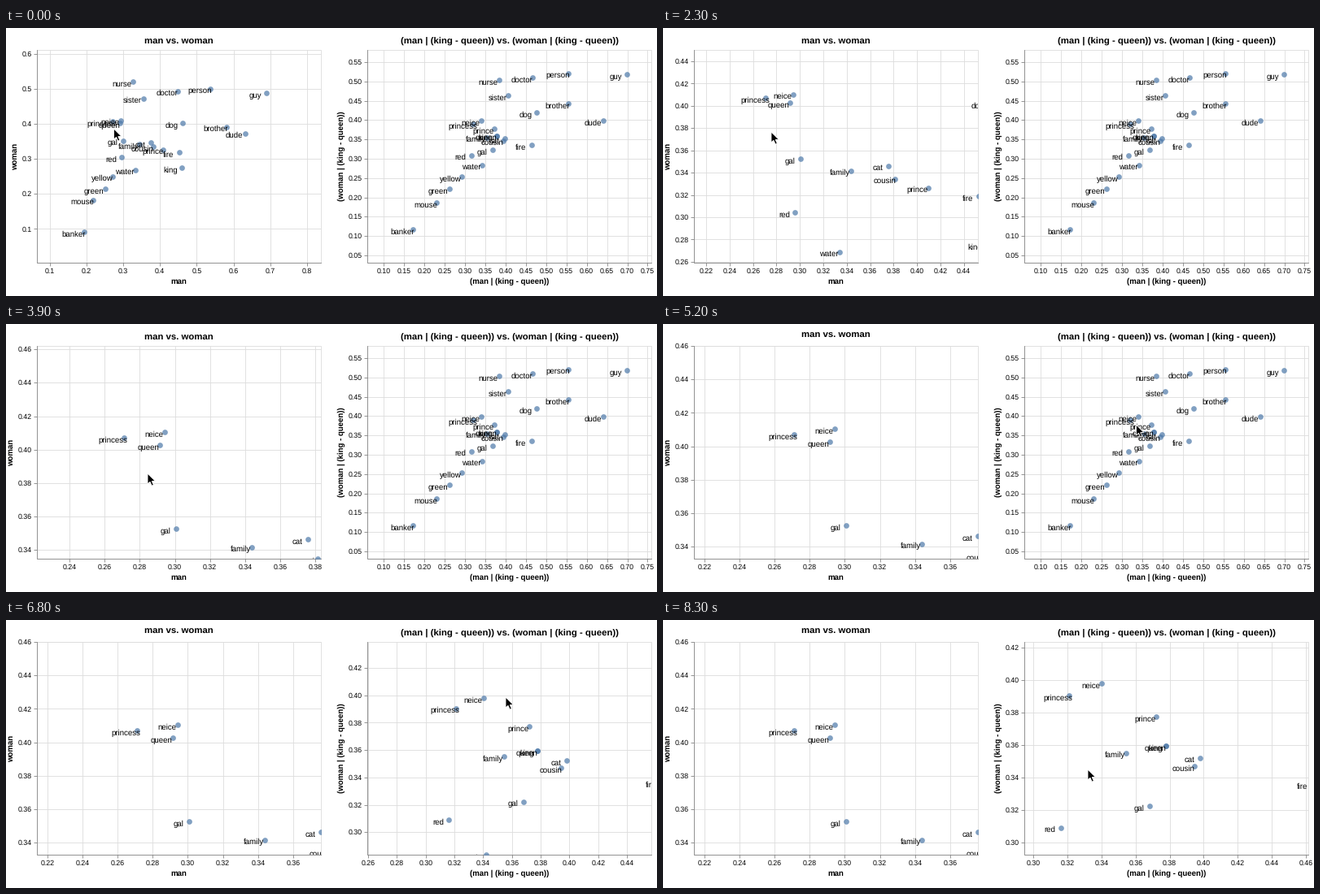
These frames come from a looping animation (800 px wide and 330 px high, 8.4 s). A matplotlib script:

```python
import math

import matplotlib.pyplot as plt
import numpy as np
from matplotlib.animation import FuncAnimation
from matplotlib.patches import Polygon, Rectangle

plt.rcParams["font.family"] = "Liberation Sans"
plt.rcParams["text.hinting"] = "none"

DPI = 100
PT = 72 / DPI
S = 0.8725  # chart pixels to stage pixels
W, H, TOP = 349, 262, 27
BOTTOM = TOP + H

# word: left chart x, y, then right chart x, y
WORDS = {
    "nurse": (.3265, .5206, .3845, .5038),
    "doctor": (.4488, .4937, .4666, .5101),
    "person": (.5380, .5010, .5547, .5216),
    "guy": (.6896, .4875, .6980, .5185),
    "sister": (.3552, .4731, .4068, .4629),
    "dog": (.4609, .4018, .4759, .4189),
    "brother": (.5804, .3923, .5547, .4418),
    "dude": (.6311, .3733, .6409, .3987),
    "gal": (.3007, .3526, .3683, .3223),
    "princess": (.2708, .4071, .3208, .3904),
    "neice": (.2942, .4105, .3401, .3979),
    "queen": (.2912, .4027, .3778, .3594),
    "king": (.4586, .2751, .3778, .3594),
    "prince": (.4094, .3264, .3721, .3772),
    "family": (.3436, .3417, .3544, .3551),
    "cat": (.3758, .3463, .3981, .3521),
    "cousin": (.3815, .3345, .3943, .3468),
    "fire": (.4526, .3187, .4641, .3358),
    "red": (.2960, .3044, .3162, .3090),
    "water": (.3338, .2688, .3418, .2834),
    "yellow": (.2718, .2506, .2922, .2532),
    "green": (.2506, .2149, .2613, .2223),
    "mouse": (.2173, .1833, .2302, .1866),
    "banker": (.1940, .0919, .1721, .1172),
}
DATA = np.array(list(WORDS.values()))

# Camera keys: frame, zoom, value at the left edge, value at the top edge
LEFT_VIEW = [
    (9, 1, .0657, .6116), (14, 1.462, .1311, .5365), (18, 1.8, .1587, .5070),
    (25, 3.996, .2229, .4352), (27, 3.996, .2239, .4698),
    (29, 3.996, .2239, .4698), (34, 4.772, .2325, .4650),
    (36, 4.772, .2325, .4650), (41, 4.772, .2140, .4601),
]
RIGHT_VIEW = [
    (54, 1, .0599, .5815), (60, 2.22, .2110, .4704), (65, 3.54, .2594, .4390),
    (70, 3.54, .2594, .4390), (75, 4.194, .2744, .4327),
    (77, 4.194, .2744, .4327), (81, 4.194, .2947, .4235),
]
# Pointer keys: frame, x, y
POINTER = [
    (0, 132.5, 124), (1, 132.5, 127.5), (25, 133, 128), (27, 133, 188),
    (29, 134, 80), (34, 134, 80), (36, 150, 190), (41, 190, 180),
    (42, 190, 180), (50, 581.5, 124), (53, 581.5, 124), (54, 581.5, 122),
    (65, 581.5, 122), (67, 614, 95), (77, 614, 95), (81, 572, 77),
    (83, 522, 184),
]
ARROW = np.array([(0, 0), (0, 13), (3, 10.4), (5.2, 15.2), (7.4, 14.2),
                  (5.3, 9.6), (9.4, 9.4)])

fig = plt.figure(figsize=(800 / DPI, 330 / DPI), dpi=DPI, facecolor="white")
ax = fig.add_axes([0, 0, 1, 1])


def camera(keys, frame):
    """Zoom exponentially about a fixed point, pan linearly."""
    if frame <= keys[0][0]:
        return keys[0][1:]
    for (f0, k0, l0, t0), (f1, k1, l1, t1) in zip(keys, keys[1:]):
        if frame <= f1:
            u = (frame - f0) / (f1 - f0)
            k = k0 * (k1 / k0) ** u
            w = u if k0 == k1 else (1 / k - 1 / k0) / (1 / k1 - 1 / k0)
            return k, l0 + (l1 - l0) * w, t0 + (t1 - t0) * w
    return keys[-1][1:]


def nice_ticks(lo, hi, count):
    raw = (hi - lo) / count
    power = math.floor(math.log10(raw))
    error = raw / 10 ** power
    factor = next((f for f in (10, 5, 2) if error >= math.sqrt(f * f / 2)
                   and (f != 5 or error >= math.sqrt(10))
                   and (f != 2 or error >= math.sqrt(2))), 1)
    # thresholds are sqrt(50), sqrt(10) and sqrt(2)
    if factor in (2, 1) and error >= math.sqrt(10):
        factor = 5
    elif factor == 1 and error >= math.sqrt(2):
        factor = 2
    step = factor * 10.0 ** power
    first, last = math.ceil(lo / step - 1e-6), math.floor(hi / step + 1e-6)
    decimals = max(0, -math.floor(math.log10(step) + 1e-9))
    return np.arange(first, last + 1) * step, decimals


def label(x, y, text, size, bold=False, ha="center", **kw):
    return ax.text(x, y, text, fontsize=size * S * PT, ha=ha, va="baseline",
                   color="black", weight="bold" if bold else "normal", **kw)


def chart(x0, scale, view, points, x_name, y_name):
    zoom, left, top = view
    sx, sy = scale[0] * zoom, scale[1] * zoom

    def to_x(v):
        return x0 + (v - left) * sx

    def to_y(v):
        return TOP + (top - v) * sy

    x_ticks, x_dec = nice_ticks(left, left + W / sx, 10)
    y_ticks, y_dec = nice_ticks(top - H / sy, top, 8)
    xs, ys = to_x(x_ticks), to_y(y_ticks)
    thin = S * PT
    ax.vlines(xs, TOP, BOTTOM, color="#dddddd", lw=thin)
    ax.hlines(ys, x0, x0 + W, color="#dddddd", lw=thin)
    ax.add_patch(Rectangle((x0, TOP), W, H, fill=False, ec="#dddddd", lw=thin))
    ax.vlines(xs, BOTTOM, BOTTOM + 5 * S, color="#888888", lw=thin)
    ax.hlines(ys, x0 - 5 * S, x0, color="#888888", lw=thin)
    ax.plot([x0, x0, x0 + W], [TOP, BOTTOM, BOTTOM], color="#888888", lw=thin)
    for x, v in zip(xs, x_ticks):
        label(x, 302.3, f"{v:.{x_dec}f}", 10)
    for y, v in zip(ys, y_ticks):
        label(x0 - 6, y + 3, f"{v:.{y_dec}f}", 10, ha="right")

    clip = Rectangle((x0, TOP), W, H, transform=ax.transData)
    px, py = to_x(points[:, 0]), to_y(points[:, 1])
    dots = ax.scatter(px, py, s=60 * (S * PT) ** 2, c="#4c78a8", alpha=.7,
                      linewidths=0, zorder=3)
    dots.set_clip_path(clip)
    for word, x, y in zip(WORDS, px, py):
        if x0 - 30 < x < x0 + W + 40 and TOP - 20 < y < BOTTOM + 20:
            text = label(x - 13.2, y + 5.5, word, 11, zorder=4, clip_on=True)
            text.set_clip_path(clip)

    # A tick label close to the top edge pushes the title up.
    lift = max(0, 3.3 - (ys.min() - TOP))
    middle = x0 + W / 2
    label(middle, 20 - lift, f"{x_name} vs. {y_name}", 13, True)
    label(middle, 315, x_name, 11, True)
    label(x0 - 29 + 4.85 * (2 - y_dec), TOP + H / 2, y_name, 11, True,
          rotation=90, rotation_mode="anchor")


def draw(frame):
    ax.clear()
    ax.set_axis_off()
    ax.set_xlim(0, 800)
    ax.set_ylim(330, 0)
    chart(38, (452, 431), camera(LEFT_VIEW, frame), DATA[:, :2],
          "man", "woman")
    chart(444, (499.2, 476), camera(RIGHT_VIEW, frame), DATA[:, 2:],
          "(man | (king - queen))", "(woman | (king - queen))")
    times, mx, my = zip(*POINTER)
    tip = np.interp(frame, times, mx), np.interp(frame, times, my)
    ax.add_patch(Polygon(ARROW + tip, fc="black", ec="white", lw=.9 * PT,
                         zorder=6))
    return []


anim = FuncAnimation(fig, draw, frames=84, interval=100, repeat=True,
                     repeat_delay=0, cache_frame_data=False)
plt.show()
```
